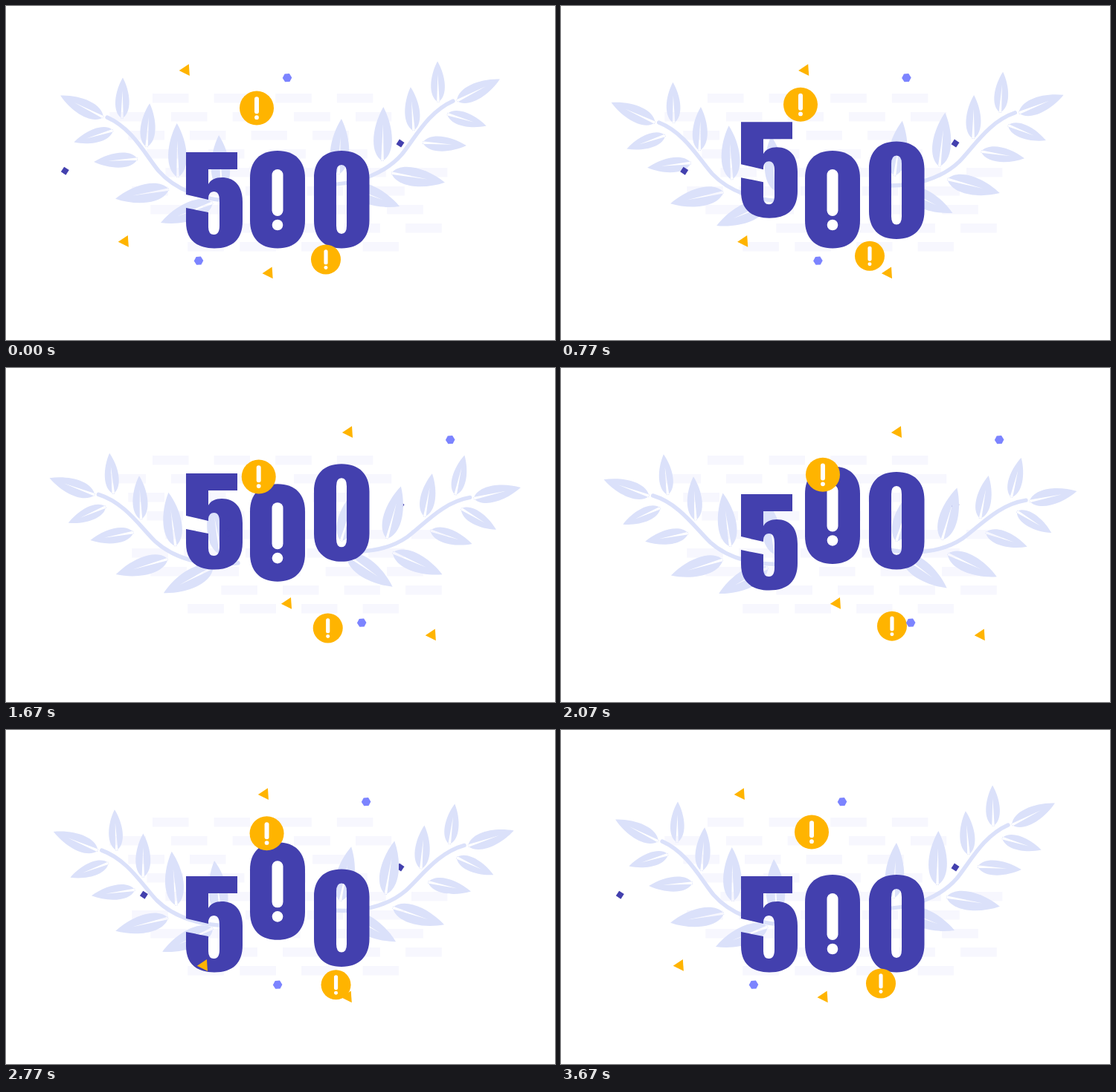
An HTML page that plays this animation: 738 px wide and 450 px high, repeating every 3.71 s.

```html
<!DOCTYPE html>
<html lang="en">
<head>
<meta charset="utf-8">
<title>500</title>
<style>
html, body { margin: 0; width: 100%; height: 100%; overflow: hidden; background: #fff; }
svg { display: block; width: 738px; height: 450px; }
</style>
</head>
<body>
<svg viewBox="0 0 738 450">
  <defs>
    <g id="branch" fill="#dbe1fa">
      <path d="M136 150C170 165 187 200 205 222C225 245 262 263 312 263" fill="none" stroke="#dbe1fa" stroke-width="5.4" stroke-linecap="round"/>
    </g>
  </defs>
  <g id="bricks" fill="#f7f7fe"></g>
  <use id="left" href="#branch"/>
  <g id="right"><use href="#branch" transform="translate(737 -22) scale(-1 1)"/></g>
  <g fill="#4340ae">
    <path id="five" d="M242 197H311V220H272V240C275 234 282 231 290 231C308 231 318 243 318 264V290C318 314 305 326.5 280 326.5C255 326.5 242 314 242 291V272L272 278V298Q272 308 279.5 308Q287 308 287 296V262Q287 250 279.5 250Q273 250 272 258V261L242 254Z"/>
    <g id="mid">
      <path d="M365 195C389 195 402 209 402 232V289C402 312 389 326.5 365 326.5S328 312 328 289V232C328 209 341 195 365 195Z"/>
      <g fill="#fff"><rect x="357.5" y="220" width="15" height="63" rx="7.5"/><circle cx="365" cy="295" r="7.3"/></g>
    </g>
    <path id="last" fill-rule="evenodd" d="M451 195C475 195 488.5 209 488.5 232V289C488.5 312 475 326.5 451 326.5S414 312 414 289V232C414 209 427 195 451 195ZM451 214Q444 214 444 225V296Q444 307 451 307T458 296V225Q458 214 451 214Z"/>
  </g>
  <g id="coins"></g>
  <g id="confetti"></g>
</svg>
<script>
const $ = id => document.getElementById(id);

function add(parent, tag, attrs) {
  const el = document.createElementNS('http://www.w3.org/2000/svg', tag);
  for (const k in attrs) el.setAttribute(k, attrs[k]);
  $(parent).append(el);
}

// brick wall: each row steps to the right, cut to a ragged outline
for (let row = 0; row < 9; row++) {
  const from = row < 7 ? 135 : 220, to = row < 4 ? 480 : 550;
  for (let k = -2; k < 4; k++) {
    const x = 197 + 25 * row + 82.6 * k;
    if (x > from && x < to)
      add('bricks', 'rect', { x: k < -1 ? x + 12.5 : x, y: 118 + 25 * row, width: 48.5, height: 12.5 });
  }
}

// leaf with a tapering slit, growing from its base
function leaf(x, y, len, angle) {
  const w = len * .17, near = len * .15, far = len * .65;
  add('branch', 'path', {
    d: `M0 0C${near} ${-1.5 * w} ${far} ${-1.15 * w} ${len} 0` +
       `C${far} ${1.15 * w} ${near} ${1.5 * w} 0 0ZM0 -1.8L${len * .68} 0L0 1.8Z`,
    'fill-rule': 'evenodd',
    transform: `translate(${x} ${y}) rotate(${angle})`
  });
}

// leaf pairs along the stem: place, length, upper and lower angle
for (const [x, y, len, up, down] of [
  [150, 159.5, 55, -89, 163],
  [183, 198, 59, -86, 176],
  [225, 239, 73, -91, 170],
  [284, 257, 75, -93, 159]
]) {
  leaf(x + 6, y - 8, len, up);
  leaf(x - 6, y + 8, len, down);
}
leaf(131, 150, 65, 207);

function coin(cx, cy, r) {
  const w = r * .26;
  add('coins', 'circle', { cx, cy, r, fill: '#ffb400' });
  add('coins', 'rect', { x: cx - w / 2, y: cy - r * .66, width: w, height: r, rx: w / 2, fill: '#fff' });
  add('coins', 'circle', { cx, cy: cy + r * .55, r: w * .48, fill: '#fff' });
}
coin(337, 137.5, 23);
coin(430, 341.5, 20);

// regular polygon with its first corner at the given angle
function polygon(parent, x, y, sides, r, angle, fill) {
  const points = Array.from({ length: sides }, (_, i) => {
    const a = angle + i * 2 * Math.PI / sides;
    return [x + r * Math.cos(a), y + r * Math.sin(a)];
  });
  add(parent, 'polygon', { points: points.join(' '), fill });
}
for (const [x, y] of [[241.8, 86.5], [159.8, 317.2], [353.6, 359.7]])
  polygon('confetti', x, y, 3, 9.1, .98, '#ffb400');
for (const [x, y] of [[378, 96.7], [259, 343.2]])
  polygon('confetti', x, y, 6, 6.3, -.05, '#7c84ff');
for (const [parent, x] of [['confetti', 79.3], ['bricks', 530]])
  polygon(parent, x, parent === 'bricks' ? 185.1 : 222.2, 4, 5.6, -.2, '#4340ae');

const LOOP = 3710, FPS = 30, LAST = 110;

function ease(p) {
  p = Math.min(1, Math.max(0, p));
  return p * p * (3 - 2 * p);
}

// eased 0 -> 1 -> 0 with its top at `peak`
const swing = (n, start, peak, end) =>
  n < peak ? ease((n - start) / (peak - start)) : ease((end - n) / (end - peak));

// smooth closed path of the coins through evenly timed points
const path = [[0, 0], [-12, -7.5], [-19, 8.6], [10, 8], [17, 2.7], [8.7, 1.5]];

function drift(n) {
  const pos = n / LAST * path.length, i = Math.floor(pos), u = pos - i;
  const [a, b, c, d] = [5, 0, 1, 2].map(s => path[(i + s) % path.length]);
  return [0, 1].map(k => b[k] + u / 2 * (c[k] - a[k] +
    u * (2 * a[k] - 5 * b[k] + 4 * c[k] - d[k] + u * (3 * (b[k] - c[k]) + d[k] - a[k]))));
}

const move = (id, x, y) => $(id).setAttribute('transform', `translate(${x} ${y})`);
const turn = (id, angle, x, y) => $(id).setAttribute('transform', `rotate(${angle} ${x} ${y})`);
const hop = (id, n, start) => move(id, 0, -66 * swing(n, start, start + 39.7, start + 79.4));

function draw(ms) {
  const n = Math.min(LAST, Math.round(ms % LOOP * FPS / 1000));
  const sway = swing(n, 0, 60, LAST);
  turn('left', -7 * sway, 310, 263);
  turn('right', 15.1 * sway, 423, 244);
  hop('five', n, 0);
  hop('last', n, 12);
  hop('mid', n, 27.8);
  move('coins', ...drift(n));
  move('confetti', 223 * swing(n, 0, 54.2, LAST), 0);
}

const start = performance.now();
(function tick() {
  draw(performance.now() - start);
  requestAnimationFrame(tick);
})();
</script>
</body>
</html>
```
